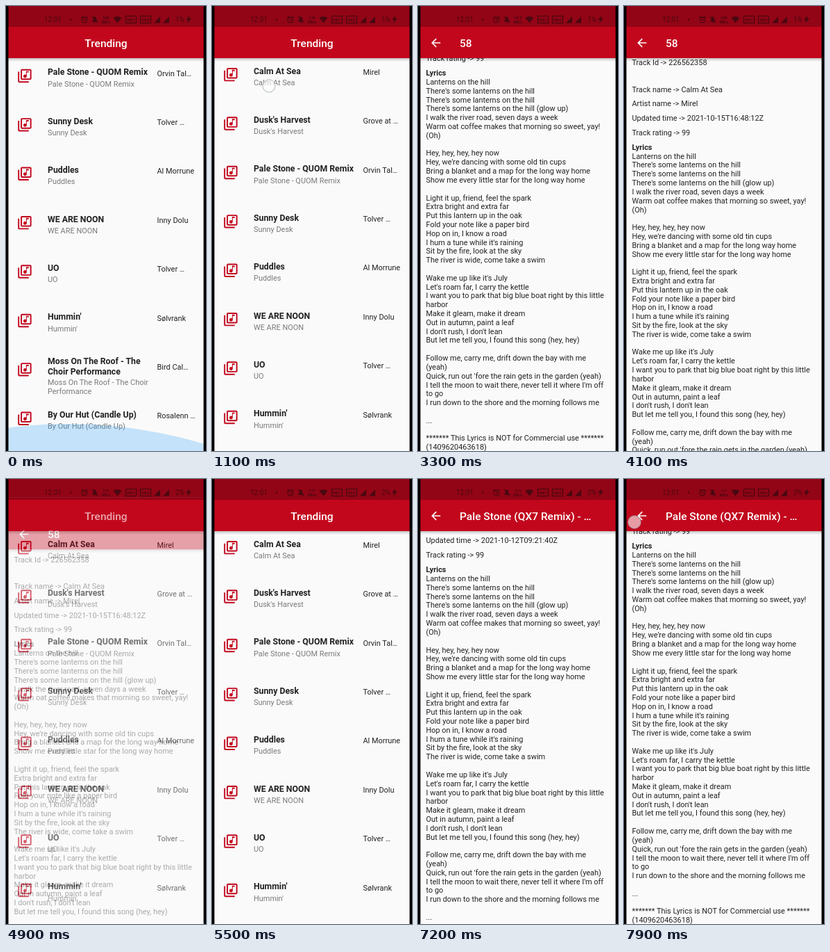
Write an HTML page that moves like this. It is 288 by 640 pixels and loops after 8 s.

```html
<!DOCTYPE html>
<html lang="en">
<head>
<meta charset="utf-8">
<title>Trending songs</title>
<style>
  html, body { margin: 0; height: 100%; overflow: hidden; background: #000; }
  svg { display: block; width: 100vw; height: 100vh; }
  text { font: 10.93px Roboto, sans-serif; fill: #222; white-space: pre; }
  .bold { font-weight: 700; }
  .name { font-size: 12.3px; font-weight: 700; }
  .sub { fill: #7a7a7a; }
  .bar { font-size: 15.5px; font-weight: 500; fill: #fff; }
  .status text { font-size: 10px; fill: #4a0810; }
  .status .tiny { font-size: 5.6px; font-weight: 700; text-anchor: middle; }
</style>
</head>
<body>
<svg viewBox="0 0 288 640">
  <defs>
    <linearGradient id="shade" x2="0" y2="1">
      <stop stop-color="#000" stop-opacity=".22"/>
      <stop offset="1" stop-color="#000" stop-opacity="0"/>
    </linearGradient>
    <path id="music" d="M20 2H8c-1.1 0-2 .9-2 2v12c0 1.1.9 2 2 2h12c1.1 0 2-.9 2-2V4c0-1.1-.9-2-2-2zm0 14H8V4h12v12zm-7.5-1c1.38 0 2.5-1.12 2.5-2.5V7h3V5h-4v5.51c-.42-.32-.93-.51-1.5-.51-1.38 0-2.5 1.12-2.5 2.5s1.12 2.5 2.5 2.5zM4 6H2v14c0 1.1.9 2 2 2h14v-2H4V6z"/>
    <path id="back" d="M20 11H7.83l5.59-5.59L12 4l-8 8 8 8 1.41-1.41L7.83 13H20z"/>
  </defs>
  <g id="pages"></g>
  <g class="status">
    <rect width="288" height="30" fill="#000" opacity=".25"/>
    <text x="55" y="23">12:01</text>
    <circle cx="93" cy="19.5" r="1.3" fill="#4a0810"/>
    <g fill="none" stroke="#4a0810" stroke-width="1.2">
      <circle cx="113" cy="20" r="3.9"/>
      <path d="M113 17.5V20l2 1M108.500 17l2.500-2M117.500 17l-2.500-2M124 15l8 9"/>
      <rect x="172.500" y="14.500" width="15" height="10"/>
      <rect x="193.500" y="14.500" width="15" height="10"/>
    </g>
    <path fill="#4a0810" d="M124 23c2-2 1-7 4-8 3 1 2 6 4 8zM127 24h2l-1 1zM154.500 17q6-4 12 0l-6 7.500zM213 24.500h9v-9.500zM226 24.500h9v-9.500zM264 14l-5 6h3l-1 5 6-7h-3z"/>
    <text class="tiny" id="speed" x="144" y="19"></text>
    <text class="tiny" x="144" y="24.500">KB/s</text>
    <text class="tiny" x="180" y="21.500">HD1</text>
    <text class="tiny" x="201" y="21.500">HD2</text>
    <text id="charge" x="244" y="23"></text>
  </g>
  <circle id="touch" r="9" fill="#fff" fill-opacity=".6" stroke="#aeb6bd" stroke-opacity=".7" stroke-width="1.3"/>
  <path d="M0 0h3.500v640H0zM284.500 0h3.500v640h-3.500z"/>
</svg>
<script>
const LOOP = 8000, ROW = 70.4, LINE = 12.81, LIST_END = 139, LYRICS_END = 115;
const $ = id => document.getElementById(id);

const songs = [
  ["Calm At Sea", "Mirel"],
  ["Dusk's Harvest", "Grove at …"],
  ["Pale Stone - QUOM Remix", "Orvin Tal…"],
  ["Sunny Desk", "Tolver …"],
  ["Puddles", "Al Morrune"],
  ["WE ARE NOON", "Inny Dolu"],
  ["UO", "Tolver …"],
  ["Hummin'", "Sølvrank"],
  ["Moss On The Roof - The|Choir Performance", "Bird Cal…", "Moss On The Roof - The Choir|Performance"],
  ["By Our Hut (Candle Up)", "Rosalenn …"]
];

const lyrics = `Lanterns on the hill
There's some lanterns on the hill
There's some lanterns on the hill
There's some lanterns on the hill (glow up)
I walk the river road, seven days a week
Warm oat coffee makes that morning so sweet, yay!
(Oh)

Hey, hey, hey, hey now
Hey, we're dancing with some old tin cups
Bring a blanket and a map for the long way home
Show me every little star for the long way home

Light it up, friend, feel the spark
Extra bright and extra far
Put this lantern up in the oak
Fold your note like a paper bird
Hop on in, I know a road
I hum a tune while it's raining
Sit by the fire, look at the sky
The river is wide, come take a swim

Wake me up like it's July
Let's roam far, I carry the kettle
I want you to park that big blue boat right by this little
harbor
Make it gleam, make it dream
Out in autumn, paint a leaf
I don't rush, I don't lean
But let me tell you, I found this song (hey, hey)

Follow me, carry me, drift down the bay with me
(yeah)
Quick, run out 'fore the rain gets in the garden (yeah)
I tell the moon to wait there, never tell it where I'm off
to go
I run down to the shore and the morning follows me

...

******* This Lyrics is NOT for Commercial use *******
(1409620463618)`.split("\n");

const text = (x, y, s, cls = "") =>
  `<text x="${x}" y="${y}" class="${cls}">${s.replace(/>/g, "&gt;")}</text>`;
const lines = (x, y, step, list, cls) =>
  list.map((s, i) => text(x, y + i * step, s, cls)).join("");

function row([name, artist, sub = name], i) {
  const y = i * ROW, names = name.split("|"), lift = names.length > 1 ? 6.5 : 0;
  return `<use href="#music" fill="#c2071d" transform="translate(15.300 ${y + 87}) scale(.97)"/>`
    + lines(60, y + 97.5 - lift, 14.4, names, "name")
    + lines(60, y + 113.7 + lift * 1.15, LINE, sub.split("|"), "sub")
    + text(217.5, y + 98.8, artist);
}

const page = (id, title, body) => `<g id="${id}">
  <rect width="288" height="640" fill="#fafafa"/>${body}
  <rect y="75" width="288" height="5" fill="url(#shade)"/>
  <rect width="288" height="75" fill="#c2071d"/>${title}</g>`;

const detail = (id, title, track, artist, number, date, rating) => page(id,
  `<use href="#back" fill="#fff" transform="translate(15.900 43.200) scale(.82)"/>` + text(60, 58.7, title, "bar"),
  `<path class="spin" fill="none" stroke="#2196f3" stroke-width="3.200"/><g class="scroll">`
  + text(11.5, 93.5, "Track Id -> " + number)
  + lines(11.5, 132, 20.7, ["Track name -> " + track, "Artist name -> " + artist,
    "Updated time -> " + date, "Track rating -> " + rating])
  + text(11.5, 215, "Lyrics", "bold") + lines(11.5, 228, LINE, lyrics) + `</g>`);

$("pages").innerHTML =
  page("list", `<text x="144" y="58.700" class="bar" text-anchor="middle">Trending</text>`,
    `<g class="scroll">${songs.map(row).join("")}</g>
     <circle id="glow" cx="90" cy="1273" r="672" fill="#2196f3"/>`)
  + detail("first", "58", "Calm At Sea", "Mirel", "226562358", "2021-10-15T16:48:12Z", "99")
  + detail("second", "Pale Stone (QX7 Remix) - …", "Pale Stone - QUOM Remix", "Orvin Tal…",
    "221745063", "2021-10-12T09:21:40Z", "99");

const clamp = v => Math.min(1, Math.max(0, v));
const span = (t, a, b) => clamp((t - a) / (b - a));
const decel = v => 1 - (1 - v) ** 3;

// cubic-bezier(.4, 0, .2, 1)
function swift(x) {
  let lo = 0, hi = 1, u;
  for (let i = 0; i < 20; i++) {
    u = (lo + hi) / 2;
    const bx = 1.2 * u * (1 - u) ** 2 + .6 * u * u * (1 - u) + u ** 3;
    if (bx < x) lo = u; else hi = u;
  }
  return u * u * (3 - 2 * u);
}

const part = (id, cls) => $(id).querySelector("." + cls);
const shift = (el, y) => el.setAttribute("transform", `translate(0 ${y})`);

function spinner(ms) {
  const p = ms / 1333 % 1;
  const head = swift(clamp(p * 2)) * 270, tail = swift(clamp(p * 2 - 1)) * 270;
  const from = -90 + tail + ms / 2222 * 360 + p * 90;
  const sweep = Math.max(head - tail, .5);
  const at = deg => {
    const a = deg * Math.PI / 180;
    return `${144 + 14.3 * Math.cos(a)} ${357.5 + 14.3 * Math.sin(a)}`;
  };
  return `M${at(from)}A14.3 14.3 0 ${+(sweep > 180)} 1 ${at(from + sweep)}`;
}

function showDetail(id, t, open, loaded, close, scroll) {
  const v = span(t, open, open + 300) - span(t, close, close + 300);
  const g = $(id), ready = t >= loaded;
  g.style.display = v > 0 ? "" : "none";
  g.style.opacity = v ** 1.7;
  shift(g, 160 * (1 - swift(v)));
  part(id, "spin").style.display = ready ? "none" : "";
  part(id, "scroll").style.display = ready ? "" : "none";
  part(id, "spin").setAttribute("d", spinner(Math.max(0, t - open)));
  shift(part(id, "scroll"), -LYRICS_END * scroll);
}

const taps = [[1060, 1260, 82, 115], [4660, 4780, 15, 62], [7860, 8000, 15, 62]];
const speeds = [[0, "322"], [1000, "118"], [2550, "10.2"], [3750, "205"], [4650, "177"], [5900, "433"], [7050, "111"]];

function draw(t) {
  shift(part("list", "scroll"), -LIST_END * (1 - decel(span(t, 450, 1000))));
  const fade = span(t, 70, 300);
  $("glow").style.opacity = .25 * (1 - fade);
  shift($("glow"), 30 * fade);

  showDetail("first", t, 1460, 2260, 4766,
    decel(span(t, 2940, 3300)) - decel(span(t, 3750, 4350)));
  showDetail("second", t, 5670, 6460, 9000, decel(span(t, 7050, 7500)));

  const tap = taps.find(([a, b]) => t >= a && t < b);
  $("touch").style.display = tap ? "" : "none";
  if (tap) $("touch").setAttribute("transform", `translate(${tap[2]} ${tap[3]})`);
  $("speed").textContent = speeds.filter(([at]) => at <= t).pop()[1];
  $("charge").textContent = t < 4250 ? "1%" : "2%";
}

let start;
function tick(now) {
  start ??= now;
  draw(Math.max(0, now - start) % LOOP);
  requestAnimationFrame(tick);
}
draw(0);
requestAnimationFrame(tick);
</script>
</body>
</html>
```
